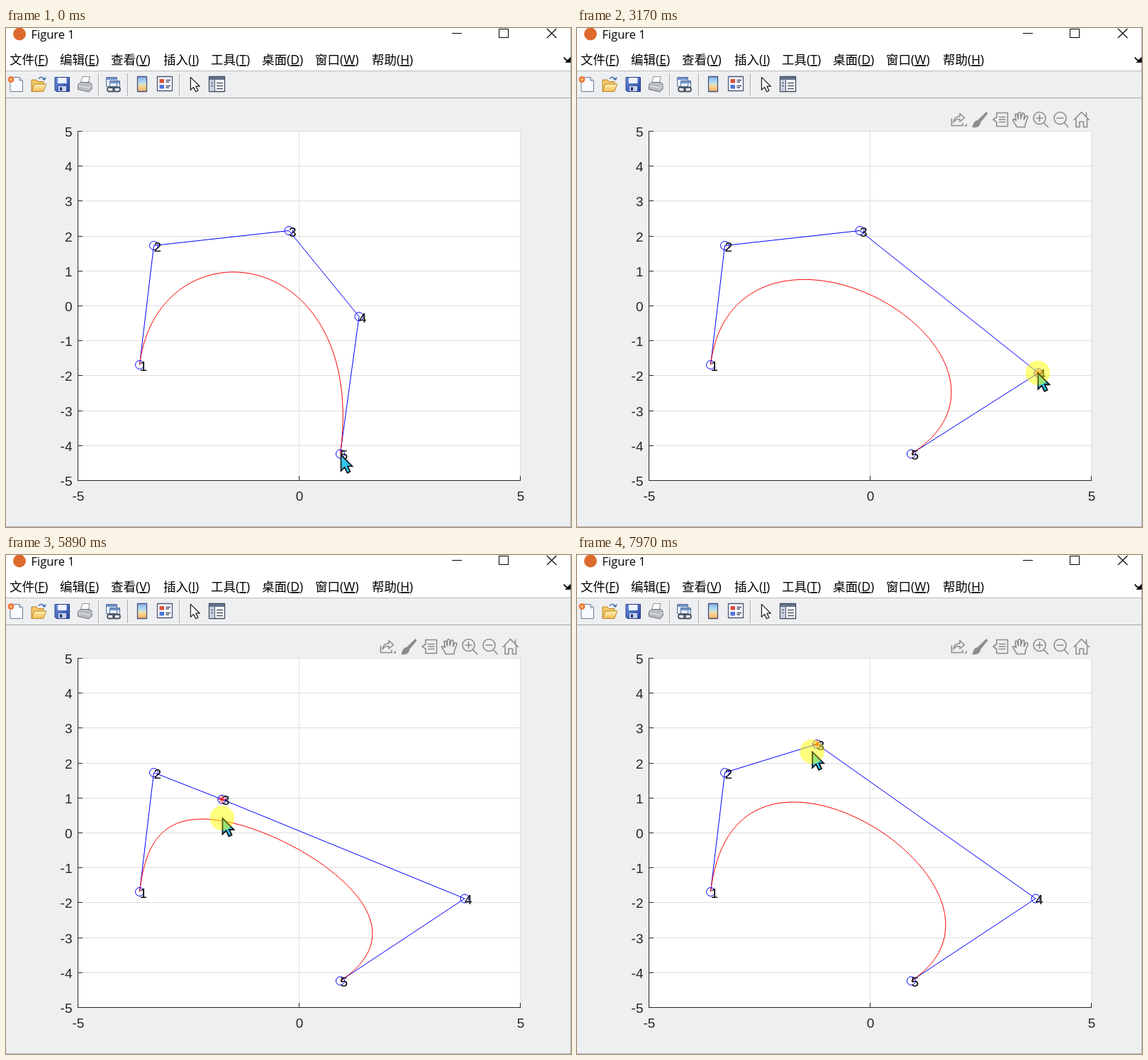
An HTML page that plays this animation: 797 by 703 pixels, repeating every 8000 ms.

```html
<!DOCTYPE html>
<html lang="zh">
<head>
<meta charset="utf-8">
<title>Figure 1</title>
<style>
  html, body { margin: 0; width: 100%; height: 100%; overflow: hidden; background: #eeeff1; }
  svg { display: block; width: 797px; height: 703px; }
  .ui { font-family: "Open Sans", "Noto Sans CJK SC", "Noto Sans CJK", sans-serif; fill: #000; }
  .menu { font-size: 17.5px; }
  .u { text-decoration: underline; }
  .plot { font: 19px "Liberation Sans", Arial, sans-serif; }
  .crisp { shape-rendering: crispEdges; }
  .line { fill: none; stroke-width: 1; }
</style>
</head>
<body>
<svg viewBox="0 0 797 703">
  <defs>
    <linearGradient id="bar" x2="0" y2="1">
      <stop stop-color="#7fb2ec"/><stop offset=".45" stop-color="#bfe3ee"/>
      <stop offset=".6" stop-color="#f6dc9c"/><stop offset="1" stop-color="#f0b060"/>
    </linearGradient>
    <linearGradient id="disk" x2="1" y2="1">
      <stop stop-color="#6d8fe0"/><stop offset="1" stop-color="#2b459f"/>
    </linearGradient>
    <linearGradient id="folder" x2="0" y2="1">
      <stop stop-color="#fff0b8"/><stop offset="1" stop-color="#f3bd52"/>
    </linearGradient>
    <linearGradient id="tip" x2="1" y2="1">
      <stop stop-color="#48cdf2"/><stop offset="1" stop-color="#1cb4e0"/>
    </linearGradient>
    <path id="arrow" d="M.5 .5V23L5.6 18L9.6 26L13.6 24L10 16.5H16.6Z"/>
  </defs>

  <!-- window -->
  <rect width="797" height="703" fill="#eeeff1"/>
  <rect width="797" height="60" fill="#fff"/>
  <g class="crisp" fill="none">
    <path d="M0 60.5H797" stroke="#b9babc"/>
    <path d="M0 98.5H797" stroke="#a3a4a6"/>
    <path d="M130.5 64V96M171.5 64V96M244.5 64V96" stroke="#a9aaac"/>
    <path d="M131.5 64V96M172.5 64V96M245.5 64V96" stroke="#fbfbfb"/>
    <path d="M796.5 0V703M0 702.5H797" stroke="#b4b5b7"/>
    <path d="M629 7.5H643M695.5 1.5H708.5V13.5H695.5Z" stroke="#000"/>
  </g>
  <path d="M763 1L776.5 14M776.5 1L763 14" stroke="#000" stroke-width="1.1"/>
  <circle cx="19" cy="8.5" r="9" fill="#dc6a2c"/>
  <text class="ui" x="35.5" y="14.5" font-size="16.5">Figure 1</text>
  <g id="menu" class="ui menu"></g>
  <path d="M787 41Q788 45 793 46M796 42V48H790Z" stroke="#000" stroke-width="1.3"/>

  <!-- toolbar -->
  <g stroke-linejoin="round">
    <path d="M6 69.5H19L23.5 74V89.5H6Z" fill="#f8fbff" stroke="#6d7c98"/>
    <path d="M19 69.5V74H23.5" fill="#cfdcf0" stroke="#6d7c98"/>
    <circle cx="7" cy="72.5" r="3" fill="#ffe08c" stroke="#ef7a3c" stroke-width="3"/>

    <path d="M36 89V73H43L45 75.5H53V89Z" fill="#f5c766" stroke="#b98328"/>
    <path d="M36 89.5L40 79H57L52.5 89.5Z" fill="url(#folder)" stroke="#b98328"/>
    <path d="M46 71.5Q51 67 54 72M51.5 71.5L54.5 73L56 69.5" fill="none" stroke="#3f6fae" stroke-width="1.5"/>

    <path d="M69 69.5H89.5V89.5H71L69 87.5Z" fill="url(#disk)" stroke="#263c87"/>
    <path d="M73 70H85.5V78H73Z" fill="#eef3ff"/><path d="M74 82H85V89H74Z" fill="#c8d3ea"/>
    <path d="M76 83.5H79V88H76Z" fill="#1f3068"/>

    <path d="M105 78L108 68.5H118L116 78Z" fill="#fff" stroke="#8a8d93"/>
    <path d="M101.5 80L105 76.5H118L121 79V86L117 90L101.5 86.5Z" fill="#b9bcc2" stroke="#6e7177"/>
    <path d="M102 81.5L117 84.5L121 80.5" fill="none" stroke="#f2f2f4"/>

    <g fill="#e4edf8" stroke="#5a7196">
      <path d="M141.5 69.5H156.5V82.5H141.5ZM146.5 74.5H160.5V84.5H146.5Z"/>
      <path d="M142 71.5H156M147 76.5H160" stroke="#6f93c8" stroke-width="3"/>
    </g>
    <g fill="none" stroke="#4b5563" stroke-width="1.8">
      <rect x="143" y="83.5" width="10" height="6" rx="3"/><rect x="151" y="83.5" width="10" height="6" rx="3"/>
    </g>

    <rect x="185.5" y="68.5" width="13" height="21" fill="url(#bar)" stroke="#4b4f7c" stroke-width="1.3"/>

    <rect x="213.5" y="68.5" width="21" height="20" fill="#fafbff" stroke="#4f5577" stroke-width="1.3"/>
    <path d="M216.5 72H223V77.5H216.5Z" fill="#d84f3c"/><path d="M216.5 80H223V85.5H216.5Z" fill="#4d74d8"/>
    <path d="M225.5 73.5H232M225.5 76H230M225.5 81.5H232M225.5 84H230" stroke="#444b66" stroke-width="1.3"/>

    <use href="#arrow" transform="translate(260 69) scale(.8)" fill="#fff" stroke="#222" stroke-width="1.6"/>

    <rect x="286.5" y="68.5" width="22" height="21" fill="#fff" stroke="#434a5c" stroke-width="1.3"/>
    <path d="M287 69H308V73H287Z" fill="#65728c"/><path d="M287 73H294V89H287Z" fill="#c6cfdf"/>
    <path d="M294.5 73V89M289 77.5H292M289 81.5H292" stroke="#434a5c"/>
    <path d="M297 77.5H306M297 81.5H306M297 85.5H306" stroke="#4c5568" stroke-width="1.5"/>
  </g>

  <!-- axes -->
  <rect x="101" y="145" width="625" height="493" fill="#fff"/>
  <path id="grid" class="crisp line" stroke="#dedede"/>
  <path id="ticks" class="crisp line" stroke="#262626"/>
  <g id="scale" class="plot" fill="#262626"></g>

  <g id="tools" fill="none" stroke="#8b8c8e" stroke-width="1.6" stroke-linejoin="round" stroke-linecap="round">
    <path d="M528.5 128V137.5H544V134M531 133Q532 125 540 124.5V120.5L546.5 126.5L540 132V128.5Q534 128 531 133Z"/>
    <path d="M546 138.5H550V134.5Z" fill="#8b8c8e" stroke="none"/>
    <path d="M577.5 119L566.5 129.5L569 132L578.5 120.5ZM565.5 130.5Q560 131 558.5 139.5Q567 140 568.5 133.5Z" fill="#8b8c8e"/>
    <path d="M592 119.5H607.5V138.5H592V132.5L587 129L592 125.5ZM595.5 125.5H604M595.5 129H604M595.5 132.5H604"/>
    <path d="M620.5 139.5Q617 133 614.5 130Q615.5 127 619.5 130.5L618 122Q619.5 119.5 621 122L622.5 128V120Q624.5 117 626 120V128L628 120.5Q630 118.5 631 121.5L630.5 129L633 124Q635.5 122.5 636 125.5L632.5 135L632 139.5Z"/>
    <circle cx="652.5" cy="127" r="8.5"/><path d="M658.5 133.5L664.5 139.5M648 127H657M652.5 122.5V131.5"/>
    <circle cx="681.5" cy="127" r="8.5"/><path d="M687.5 133.5L693 139.5M677 127H686"/>
    <path d="M701 129.5L711.5 118.5L722.5 129.5M704 128V139.5H709V132H714.5V139.5H719.5V128M718.5 124.5V119.5"/>
  </g>

  <path id="poly" class="line" stroke="#00f"/>
  <path id="curve" class="line" stroke="#f00"/>
  <g id="nodes"></g>
  <path id="star" d="M-5.5 0H5.5M0 -5.5V5.5M-4 -4L4 4M-4 4L4 -4" stroke="#f00"/>

  <use id="pointer" href="#arrow" fill="url(#tip)" stroke="#111" stroke-width="1.6"/>
  <circle id="press" r="17.3" fill="#ff0" fill-opacity=".5"/>
  <use id="edge" href="#arrow" fill="none" stroke="#111" stroke-opacity=".5" stroke-width="1.5"/>
</svg>

<script>
const LOOP = 8000, REFRESH = 77.2, LAG = 75;
const SVG = 'http://www.w3.org/2000/svg';
const $ = id => document.getElementById(id);

function add(parent, tag, attrs, text) {
  const el = parent.appendChild(document.createElementNS(SVG, tag));
  for (const k in attrs) el.setAttribute(k, attrs[k]);
  if (text) el.textContent = text;
  return el;
}

// menu bar
[['文件', 'F', 5], ['编辑', 'E', 76], ['查看', 'V', 148], ['插入', 'I', 222],
 ['工具', 'T', 289], ['桌面', 'D', 361], ['窗口', 'W', 436], ['帮助', 'H', 516]]
  .forEach(([name, key, x]) => {
    const t = add($('menu'), 'text', { x, y: 51 }, name + '(');
    add(t, 'tspan', { class: 'u' }, key);
    add(t, 'tspan', {}, ')');
  });

// grid, ticks and tick labels
let grid = '', ticks = 'M101.5 145V637.5H726';
for (let v = -5; v <= 5; v++) {
  const x = 413.5 + v * 62.4, y = Math.floor(391.5 - v * 49.2) + .5;
  grid += `M102 ${y}H726`;
  ticks += `M102 ${y}H108`;
  add($('scale'), 'text', { x: 93.5, y: y + 7.5, 'text-anchor': 'end' }, String(v));
  if (v % 5) continue;
  grid += `M${x} 145V638`;
  ticks += `M${x} 637V631`;
  add($('scale'), 'text', { x: x + .5, y: 666, 'text-anchor': 'middle' }, String(v));
}
$('grid').setAttribute('d', grid);
$('ticks').setAttribute('d', ticks);

// control points with their labels
const START = [[188.5, 474.5], [208.5, 306.5], [399, 285.5], [498, 406.5], [471.5, 600]];
const nodes = START.map((p, i) => {
  const g = add($('nodes'), 'g', {});
  add(g, 'circle', { r: 6, class: 'line', stroke: '#00f' });
  add(g, 'text', { y: 8, class: 'plot' }, String(i + 1));
  return g;
});

// turning points of the pointer: time, x, y
const TURNS = [
  [0, 472, 601], [850, 498, 407], [1150, 498, 406], [1320, 525, 405], [2080, 652, 530],
  [2240, 647, 517], [2750, 662, 282], [3080, 651, 486], [3430, 647, 484], [3930, 389, 282],
  [4940, 399, 285.5], [5100, 366, 258], [5330, 300, 176], [5850, 305, 365], [6680, 260, 590.5],
  [7620, 345, 264], [7875, 338.5, 266.5], [7955, 331.5, 277]
];

const rate = (i, k) => (TURNS[i + 1][k] - TURNS[i][k]) / (TURNS[i + 1][0] - TURNS[i][0]);

// speed at a turning point; zero where the direction reverses
function speed(i, k) {
  if (i === 0 || i === TURNS.length - 1) return 0;
  const a = rate(i - 1, k), b = rate(i, k);
  return a * b > 0 ? 2 * a * b / (a + b) : 0;
}

// smooth curve through the turning points that never overshoots
function track(t) {
  const j = TURNS.findIndex(p => p[0] > t);
  if (j < 0) return TURNS[TURNS.length - 1].slice(1);
  const a = TURNS[j - 1], b = TURNS[j], span = b[0] - a[0], f = (t - a[0]) / span;
  return [1, 2].map(k =>
    a[k] + (b[k] - a[k]) * f * f * (3 - 2 * f) +
    span * f * (1 - f) * (speed(j - 1, k) * (1 - f) - speed(j, k) * f));
}

function bezier(pts, u) {
  while (pts.length > 1)
    pts = pts.slice(1).map((p, i) => [0, 1].map(k => pts[i][k] * (1 - u) + p[k] * u));
  return pts[0];
}

const path = pts => 'M' + pts.map(p => p[0].toFixed(2) + ' ' + p[1].toFixed(2)).join('L');
const place = (el, p) => el.setAttribute('transform', `translate(${p[0]} ${p[1]})`);
const show = (el, on) => { el.style.display = on ? '' : 'none'; };
const within = (t, a, b) => t >= a && t < b;

function draw(t) {
  // dragged points trail the pointer
  const pts = START.slice();
  if (t >= 1230) pts[3] = track(Math.min(t - LAG, 3430));
  if (t >= 5015) pts[2] = track(t - LAG);

  $('poly').setAttribute('d', path(pts));
  $('curve').setAttribute('d', path(Array.from({ length: 101 }, (_, i) => bezier(pts, i / 100))));
  nodes.forEach((n, i) => place(n, pts[i]));

  show($('star'), t >= 1080);
  place($('star'), pts[t < 4780 ? 3 : 2]);

  const at = track(t);
  const down = within(t, 1080, 3500) || within(t, 4090, 4390) || t >= 4700;
  ['pointer', 'press', 'edge'].forEach(id => place($(id), at));
  show($('press'), down);
  show($('edge'), down);
  show($('tools'), t >= 240);
}

let last = -1;
function tick() {
  const step = Math.floor(performance.now() % LOOP / REFRESH);
  if (step !== last) draw((last = step) * REFRESH);
  requestAnimationFrame(tick);
}
tick();
</script>
</body>
</html>
```
